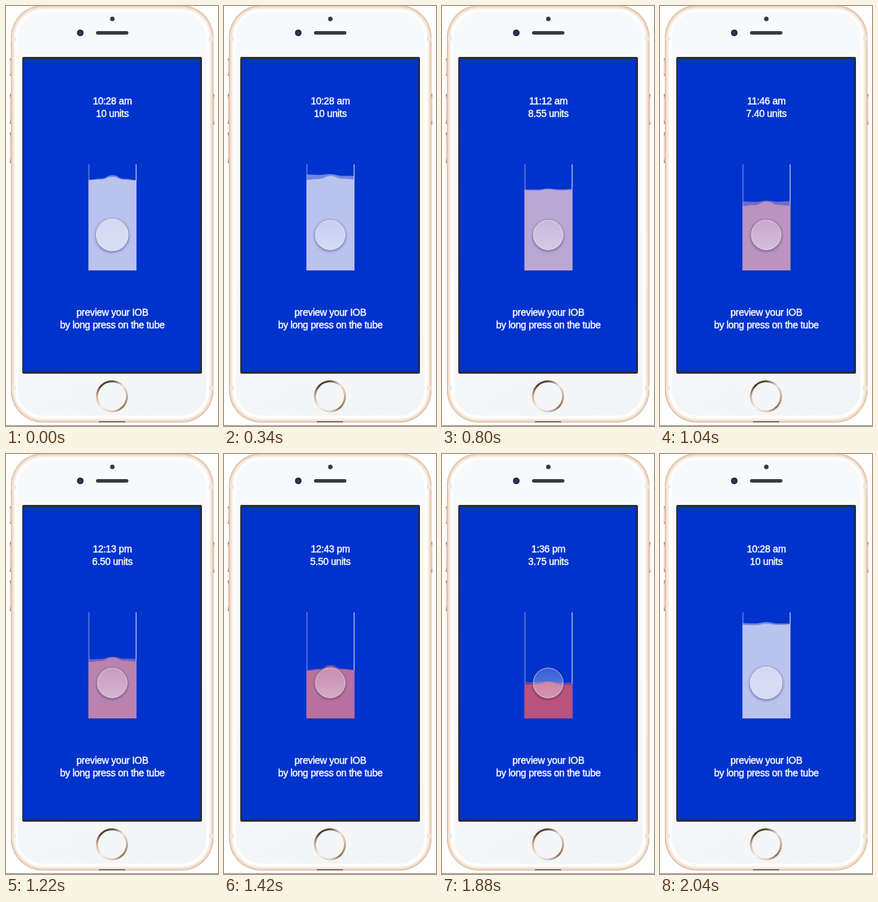
These frames come from a looping animation (304 by 602 pixels, 2.06 s). An HTML page with a canvas:

```html
<!DOCTYPE html>
<html lang="en">
<head>
<meta charset="utf-8">
<title>Tube preview</title>
<style>
  html, body { margin: 0; width: 100%; height: 100%; overflow: hidden; background: #fff; }
  canvas { position: absolute; left: 0; top: 0; width: 304px; height: 602px; }
  .label {
    position: absolute; left: 0; width: 305px; text-align: center; white-space: pre;
    font: 14px/18px "Liberation Sans", Arial, sans-serif; color: #fff;
    letter-spacing: -0.28px; -webkit-text-stroke: 0.4px #fff;
  }
</style>
</head>
<body>
<canvas id="stage" width="304" height="602"></canvas>
<div class="label" id="status" style="top:127px"></div>
<div class="label" style="top:430px">preview your IOB
by long press on the tube</div>
<script>
const ctx = document.getElementById('stage').getContext('2d');
const status = document.getElementById('status');
const LOOP = 2060, STEP = 20;
const TUBE = { left: 118.5, right: 187, top: 227, bottom: 379 };
const RELEASE = 1860, REFILLED = 1980;

// Surface offsets per time: left, middle, right
const KEYS = [0, 340, 800, 1040, 1420, 1720, 2040];
const FRONT = [[5.5, 1, 6], [5, -0.5, 4.5], [1, -0.5, 0.5], [7.5, 1, 7], [6, 0, 5], [5, -2, 6], [1, -0.5, 0.5]];
const BACK = [[5, -1.5, 5.5], [-2.5, -3, -0.5], [-0.6, -1.6, -1], [1, 0, 0.5], [5, -2, 4.5], [-1, -1, 0], [-1.5, -3, -1]];

const clamp = v => Math.max(0, Math.min(1, v));
const mix = (a, b, k) => a + (b - a) * k;
const ease = k => (1 - Math.cos(Math.PI * clamp(k))) / 2;

function roundRect(x, y, w, h, r, fill) {
  ctx.beginPath();
  ctx.roundRect(x, y, w, h, r);
  ctx.fillStyle = fill;
  ctx.fill();
}

function disc(x, y, r, fill) {
  ctx.beginPath();
  ctx.arc(x, y, r, 0, Math.PI * 2);
  ctx.fillStyle = fill;
  ctx.fill();
}

function gradient(x0, y0, x1, y1, ...colors) {
  const g = ctx.createLinearGradient(x0, y0, x1, y1);
  colors.forEach((c, i) => g.addColorStop(i / (colors.length - 1), c));
  return g;
}

function drawBody() {
  const layer = (inset, fill) =>
    roundRect(7 + inset, -1 + inset, 290.5 - inset * 2, 598 - inset * 2, 46 - inset, fill);

  // Gold edge fading inwards to white, then the face
  layer(0, '#d9b697');
  for (let i = 1; i <= 6; i++) {
    const k = i / 6;
    layer(i, `rgb(${mix(233, 255, k)},${mix(205, 254, k)},${mix(180, 253, k)})`);
  }
  ctx.fillStyle = '#e9e8e8';
  for (const x of [8, 291]) for (const y of [44, 544]) ctx.fillRect(x, y, 6, 6);
  layer(10, gradient(14, 0, 291, 595, '#f7f9fa', '#f8f9fa', '#f2f4f5'));
}

function drawPhone() {
  ctx.fillStyle = '#fff';
  ctx.fillRect(0, 0, 304, 602);
  ctx.fillStyle = '#8c8c8c';
  ctx.fillRect(0, 601, 304, 1);

  // Side buttons
  const metal = ['#8a7462', '#eed8c4', '#eed8c4', '#eed8c4', '#eed8c4', '#eed8c4', '#8a7462'];
  for (const [x, y, h] of [[5.5, 75, 25], [5.5, 126, 43], [5.5, 181, 44], [296, 126, 44]]) {
    roundRect(x, y, 2.8, h, 1, gradient(0, y, 0, y + h, ...metal));
  }

  drawBody();
  roundRect(133, 595, 38, 2, 1, '#77716c');
  disc(152.5, 18.5, 3.2, '#38383c');
  disc(106.5, 38.5, 4.8, '#2b2c42');
  disc(106.5, 38.5, 2, '#383a66');
  roundRect(129, 36, 46.5, 5, 2.5, '#3a393d');

  // Screen
  roundRect(23.3, 73, 257.7, 454, 2, '#2b2a31');
  ctx.fillStyle = '#0033cc';
  ctx.fillRect(25.5, 76, 253, 448);

  // Home button
  const ring = ctx.createConicGradient(-Math.PI / 2, 152, 559.5);
  ['#5d4632', '#efe3d7', '#c9ab8c', '#8d7056', '#e2cdb8', '#f6ede4', '#cdb193', '#4a3525', '#5d4632']
    .forEach((c, i) => ring.addColorStop(i / 8, c));
  disc(152, 559.5, 23, ring);
  disc(152, 559.5, 20.2, '#f4f5f6');
}

function unitsAt(t) {
  const falling = s => Math.min(10, 4.02 + (1720 - s) * 0.00495);
  if (t < RELEASE) return falling(t);
  return mix(falling(RELEASE), 10, ease((t - RELEASE) / (REFILLED - RELEASE)));
}

function surfaceAt(t, rows) {
  let i = 0;
  while (i < KEYS.length - 2 && t >= KEYS[i + 1]) i++;
  const k = ease((t - KEYS[i]) / (KEYS[i + 1] - KEYS[i]));
  return rows[i].map((v, j) => mix(v, rows[i + 1][j], k));
}

function drawWave(level, [l, m, r], fill, alpha) {
  const valley = edge => mix(edge, m, 0.35) + 0.8;
  const ys = [l, valley(l), m, valley(r), r].map(v => level + v);
  const gap = (TUBE.right - TUBE.left) / 4;
  const px = i => TUBE.left + gap * i;
  ctx.beginPath();
  ctx.moveTo(px(0), TUBE.bottom);
  ctx.lineTo(px(0), ys[0]);
  for (let i = 1; i < 5; i++) {
    const mid = px(i - 0.5);
    ctx.bezierCurveTo(mid, ys[i - 1], mid, ys[i], px(i), ys[i]);
  }
  ctx.lineTo(px(4), TUBE.bottom);
  ctx.closePath();
  ctx.globalAlpha = alpha;
  ctx.fillStyle = fill;
  ctx.fill();
  ctx.globalAlpha = 1;
}

function drawWalls() {
  const height = TUBE.bottom - TUBE.top;
  ctx.fillStyle = 'rgba(255,255,255,0.6)';
  ctx.fillRect(TUBE.left, TUBE.top, 0.9, height);
  ctx.fillStyle = '#fff';
  ctx.fillRect(TUBE.right - 0.8, TUBE.top, 0.9, height);
}

function drawKnob(press) {
  const x = 152.3, y = 328.2, r = mix(23.4, 21.8, press);

  // Shadow stays outside the translucent disc
  ctx.save();
  ctx.beginPath();
  ctx.rect(x - 40, y - 40, 80, 80);
  ctx.arc(x, y, r, 0, Math.PI * 2);
  ctx.clip('evenodd');
  ctx.shadowColor = 'rgba(20,25,90,0.55)';
  ctx.shadowBlur = 4;
  ctx.shadowOffsetY = 1.2;
  disc(x, y, r, '#000');
  ctx.restore();

  const white = a => `rgba(255,255,255,${a})`;
  disc(x, y, r, gradient(0, y - r, 0, y + r,
    white(mix(0.34, 0.2, press)), white(mix(0.44, 0.3, press)), white(0.4)));
  ctx.beginPath();
  ctx.arc(x, y, r - 0.5, 0, Math.PI * 2);
  ctx.strokeStyle = gradient(0, y - r, 0, y + r, white(0.6), white(0.4));
  ctx.lineWidth = 1;
  ctx.stroke();
}

function showStatus(units) {
  const ticks = Math.round((10 - units) * 20);
  const minutes = 10 * 60 + 28 + Math.round(ticks * 1.5);
  const hour = Math.floor(minutes / 60);
  const clock = `${(hour + 11) % 12 + 1}:${String(minutes % 60).padStart(2, '0')} ${hour < 12 ? 'am' : 'pm'}`;
  const amount = ticks ? (10 - ticks / 20).toFixed(2) : '10';
  const text = `${clock}\n${amount} units`;
  if (status.textContent !== text) status.textContent = text;
}

function draw(t) {
  const units = unitsAt(t);
  const level = TUBE.bottom - 13.5 * units;
  const used = (10 - units) * 18;
  const fluid = `rgb(186,${194 - used},${238 - used})`;
  const press = ease((t - 200) / 120) * (1 - ease((t - RELEASE) / 120));

  drawPhone();
  drawWalls();
  drawWave(level, surfaceAt(t, BACK), fluid, 0.6);
  drawWave(level, surfaceAt(t, FRONT), fluid, 1);
  drawKnob(press);
  showStatus(units);
}

const start = performance.now();
function tick() {
  const t = (performance.now() - start) % LOOP;
  draw(Math.floor(t / STEP) * STEP);
  requestAnimationFrame(tick);
}
tick();
</script>
</body>
</html>
```
